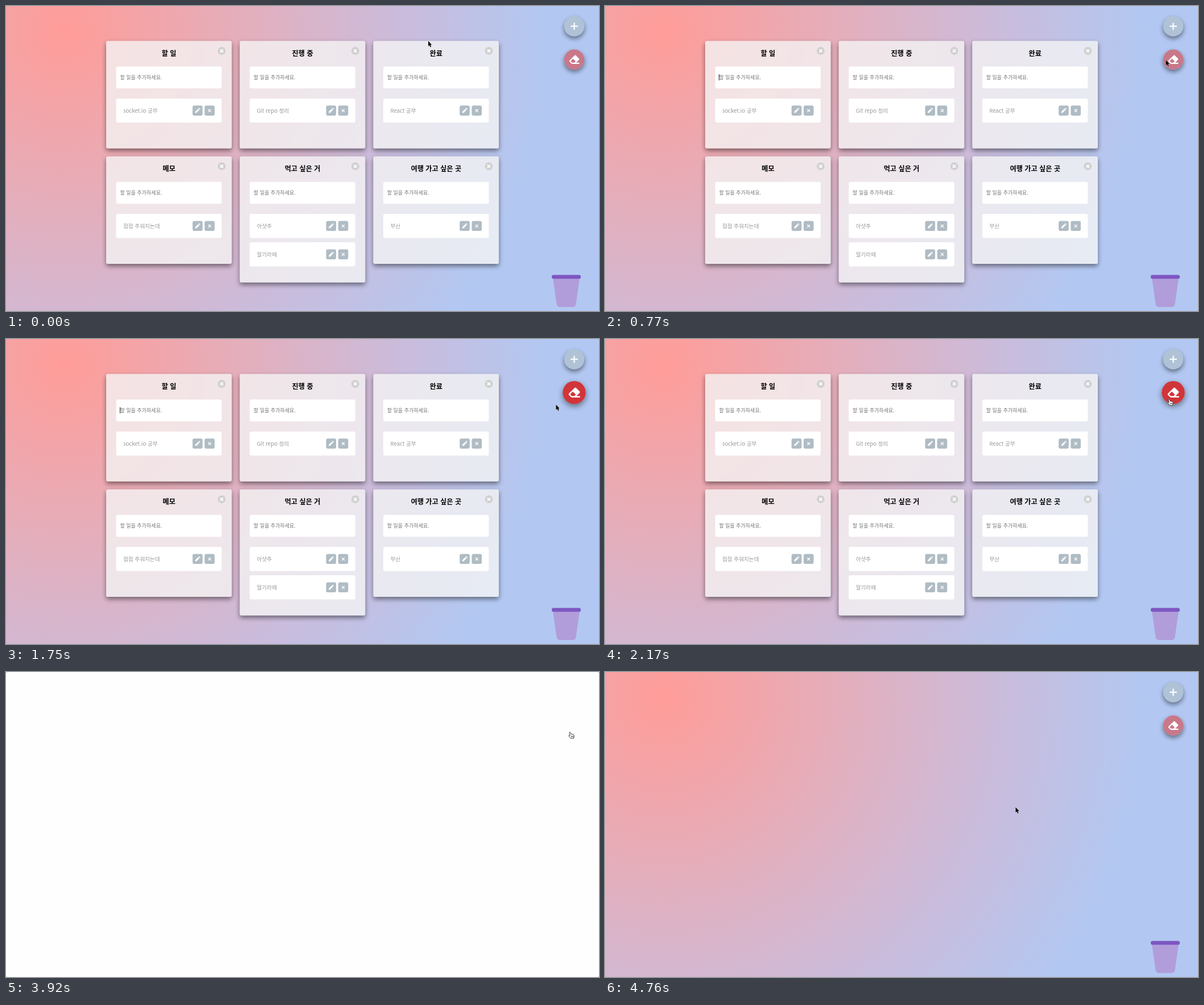
An HTML page for the animation above (5.04 s loop, 1042 by 537 pixels).

```html
<!DOCTYPE html>
<html lang="ko">
<head>
<meta charset="utf-8">
<title>Board</title>
<style>
html, body { margin: 0; width: 100%; height: 100%; overflow: hidden; background: #333; }
svg { display: block; width: 100%; height: 100%; }
text { font-family: "Noto Sans CJK KR", "Noto Sans CJK", "Noto Sans", sans-serif; }
.title { font-size: 12.2px; font-weight: 700; text-anchor: middle; }
.hint { font-size: 9px; fill: #757575; }
.item { font-size: 9.6px; fill: #999; }
.line { fill: none; stroke: #fff; }
.tool { fill: #b0bcc4; }
</style>
</head>
<body>
<svg viewBox="0 0 1042 537" preserveAspectRatio="none">
  <defs>
    <radialGradient id="sky" gradientUnits="userSpaceOnUse" cx="102" cy="45" r="850">
      <stop offset="0" stop-color="#ff9c98"/>
      <stop offset=".34" stop-color="#e6adb9"/>
      <stop offset=".7" stop-color="#cabcdc"/>
      <stop offset="1" stop-color="#b2c8f2"/>
    </radialGradient>
    <!-- shadow only outside the shape, so translucent panels stay clean -->
    <filter id="shade" x="-50%" y="-50%" width="200%" height="200%">
      <feGaussianBlur in="SourceAlpha" stdDeviation="4.5"/>
      <feOffset dy="3.5"/>
      <feComposite operator="out" in2="SourceAlpha"/>
      <feComponentTransfer><feFuncA type="linear" slope=".48"/></feComponentTransfer>
    </filter>
    <g id="pencil" transform="rotate(45)" fill="#fff">
      <path d="M-1.5-3H1.5V4L0 6-1.5 4z"/>
      <rect x="-1.5" y="-5.6" width="3" height="1.8" rx=".7"/>
    </g>
  </defs>
  <rect width="1042" height="537" rx="1.5" fill="#fefefe"/>
  <g id="page">
    <rect width="1042" height="537" rx="1.5" fill="url(#sky)"/>
    <g id="cards"></g>
    <rect id="caret" x="200" y="120" width="1" height="11" fill="#222"/>
    <g transform="translate(998.5 35.7)">
      <circle r="17.7" filter="url(#shade)"/>
      <circle r="17.7" fill="#b0c2d6"/>
      <path class="line" stroke-width="2.2" d="M-6.3 0H6.3M0-6.3V6.3"/>
    </g>
    <g id="eraser">
      <circle r="17.7" filter="url(#shade)"/>
      <circle id="disc" r="17.7"/>
      <path fill="#fff" fill-rule="evenodd" transform="scale(1.1) translate(-8 -8)"
        d="M15.5 8.5a1.5 1.5 0 0 0 0-2l-5-5a1.5 1.5 0 0 0-2 0l-8 8a1.5 1.5 0 0 0 0 2l3 3 1 .5H16v-2H11zM6 6.6l4.3 4.3L8.3 13H4.7L2.2 10.5z"/>
    </g>
    <path fill="#b19dda" d="M961 479H1008L1001.6 524Q1001 530 995 530H974Q968 530 967.4 524z"/>
    <rect x="959" y="473.6" width="51" height="6.6" rx="3" fill="#7e57c2"/>
  </g>
  <path id="arrow" stroke="#fff" stroke-width=".7" paint-order="stroke"
    d="M0 0V9.5L2.1 7.6 3.6 11 5.2 10.3 3.7 7H6.3z"/>
  <path id="hand" fill="#fff" stroke="#111" stroke-width=".8" stroke-linejoin="round"
    d="M-1.2.6Q0-1.2 1.3.8L2.2 3.3 6.6 4.2 7.4 7 6.5 10.9H1.5L-2.4 6.3Q-2.2 4.7.2 6zM2.5 6.5v2.2m1.5-2.2v2.2m1.5-2.2v2.2"/>
</svg>
<script>
const LOOP = 5040, STEP = 70, RELOAD = 3920;
const BUTTON = { x: 998.5, y: 94.2, reach: 21 };
const $ = id => document.getElementById(id);

const lists = [
  ['할 일', 'socket.io 공부'],
  ['진행 중', 'Git repo 정리'],
  ['완료', 'React 공부'],
  ['메모', '점점 추워지는데'],
  ['먹고 싶은 거', '아샷추', '딸기라떼'],
  ['여행 가고 싶은 곳', '부산']
];

const rect = (x, y, w, h, attrs) =>
  `<rect x="${x}" y="${y}" width="${w}" height="${h}" rx="3" ${attrs}/>`;
const text = (cls, x, y, s) => `<text class="${cls}" x="${x}" y="${y}">${s}</text>`;
const cross = (x, y, d, width) =>
  `<path class="line" stroke-width="${width}" d="M${x - d} ${y - d}l${2 * d} ${2 * d}m0 ${-2 * d}l${-2 * d} ${2 * d}"/>`;
const tool = x => rect(x - 8.8, -8.8, 17.6, 17.6, 'class="tool"');

function itemRow(label, i) {
  return `<g transform="translate(0 ${122.6 + i * 50})">` +
    rect(17.6, -21.2, 185.4, 42.4, 'fill="#fff"') +
    text('item', 30, 3.4, label) +
    tool(160.6) + '<use href="#pencil" x="160.6"/>' +
    tool(181.8) + cross(181.8, 0, 2.4, 1.3) + '</g>';
}

function card([title, ...items], i) {
  const x = 176 + 234.7 * (i % 3), y = 61.5 + 203.2 * Math.floor(i / 3);
  const h = items.length > 1 ? 222 : 189.2;
  return `<g transform="translate(${x} ${y})">` +
    rect(0, 0, 220.6, h, 'filter="url(#shade)"') +
    rect(0, 0, 220.6, h, 'fill="#f5f5f5" fill-opacity=".78"') +
    text('title', 110.4, 26.6, title) +
    '<circle cx="203" cy="17.5" r="6.9" fill="#d0d0d0"/>' + cross(203, 17.5, 2.6, 1.9) +
    rect(17.6, 45, 185.4, 38.6, 'fill="#fff"') +
    text('hint', 24.4, 67, '할 일을 추가하세요.') +
    items.map(itemRow).join('') + '</g>';
}
$('cards').innerHTML = lists.map(card).join('');

// pointer stops: time, x, y
const stops = [
  [0, 742, 61.5], [140, 768, 42], [560, 768, 40], [770, 985.5, 95], [840, 991, 106],
  [1540, 991, 106], [1750, 966.5, 115.5], [2030, 991, 106],
  [4410, 991, 106], [4760, 721.5, 238]
];

function pointerAt(t) {
  const i = stops.findIndex(s => s[0] > t);
  if (i < 1) return (i ? stops[stops.length - 1] : stops[0]).slice(1);
  const [t0, x0, y0] = stops[i - 1], [t1, x1, y1] = stops[i];
  const u = (t - t0) / (t1 - t0), e = u * u * (3 - 2 * u);
  return [x0 + (x1 - x0) * e, y0 + (y1 - y0) * e];
}

function isOver(t) {
  const [x, y] = pointerAt(t);
  return Math.hypot(x - BUTTON.x, y - BUTTON.y) < BUTTON.reach;
}

// the button follows the pointer over four steps
function hoverAt(t) {
  if (t >= RELOAD) return 0;
  return [1, 2, 3, 4].filter(k => isOver(t - k * STEP)).length / 4;
}

const caretAt = t => t >= 420 && t < 2730 && Math.floor((t - 420) / 525) % 2 === 0;
const show = (id, on) => { $(id).style.display = on ? '' : 'none'; };

function draw(ms) {
  const t = Math.floor(ms % LOOP / STEP) * STEP;
  show('page', t !== RELOAD);
  show('cards', t < RELOAD);
  show('caret', caretAt(t));

  const p = hoverAt(t);
  $('eraser').setAttribute('transform', `translate(${BUTTON.x} ${BUTTON.y}) scale(${1 + .19 * p})`);
  $('disc').setAttribute('fill', `rgb(${201 + 10 * p},${120 - 89 * p},${138 - 107 * p})`);

  const hand = isOver(t - STEP);
  show('hand', hand);
  show('arrow', !hand);
  $(hand ? 'hand' : 'arrow').setAttribute('transform', `translate(${pointerAt(t)})`);
}

const start = performance.now();
function tick() {
  draw(performance.now() - start);
  requestAnimationFrame(tick);
}
tick();
</script>
</body>
</html>
```
